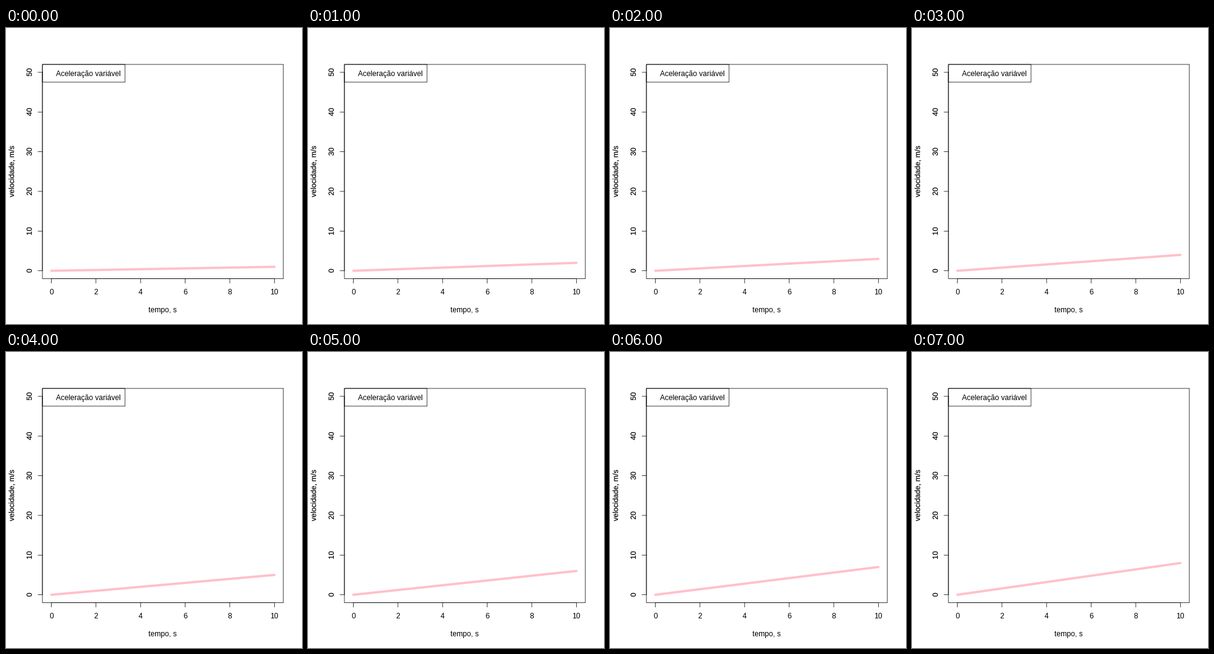
A matplotlib script that plays this animation: 480x480 px, repeating every 8000 ms.

```python
import matplotlib.pyplot as plt
from matplotlib.animation import FuncAnimation
from matplotlib.patches import PathPatch, Rectangle
from matplotlib.textpath import TextPath
from matplotlib.transforms import Affine2D

SIZE, DPI = 480, 72
LEFT, RIGHT, TOP, BOTTOM = 59.04, 449.76, 59.04, 406.56
TICK = 7.2
THIN = 0.75
FONT = "Liberation Sans"

plt.rcParams["font.family"] = FONT
plt.rcParams["font.size"] = 12
plt.rcParams["text.hinting"] = "force_autohint"

fig = plt.figure(figsize=(SIZE / DPI, SIZE / DPI), dpi=DPI, facecolor="white")
ax = fig.add_axes([0, 0, 1, 1])
ax.set_xlim(0, SIZE)
ax.set_ylim(SIZE, 0)
ax.axis("off")


def px(t):
    """Time in seconds to stage x."""
    return LEFT + (t + 0.4) / 10.8 * (RIGHT - LEFT)


def py(v):
    """Velocity in m/s to stage y."""
    return BOTTOM - (v + 2) / 54 * (BOTTOM - TOP)


def box(x0, y0, x1, y1):
    ax.add_patch(Rectangle((x0, y0), x1 - x0, y1 - y0, fill=False,
                           edgecolor="black", linewidth=THIN, snap=False))


def stroke(xs, ys):
    ax.plot(xs, ys, color="black", linewidth=THIN, snap=False,
            solid_capstyle="round")


def label(x, y, text, align="center"):
    ax.text(x, y, text, ha=align, va="baseline")


def upright(x, y, text):
    """Text reading upwards, centred on y with its baseline at x."""
    path = TextPath((0, 0), text, size=12, prop={"family": FONT})
    ends = path.get_extents()
    place = (Affine2D().translate(-(ends.x0 + ends.x1) / 2, 0)
             .scale(1, -1).rotate_deg(-90).translate(x, y))
    ax.add_patch(PathPatch(path.transformed(place), color="black",
                           linewidth=0.2, snap=False))


ramp, = ax.plot([], [], color="pink", linewidth=3.75, snap=False,
                solid_capstyle="round")

stroke([px(0), px(10)], [BOTTOM, BOTTOM])
for t in range(0, 11, 2):
    stroke([px(t), px(t)], [BOTTOM, BOTTOM + TICK])
    label(px(t), 432.5, str(t))

stroke([LEFT, LEFT], [py(0), py(50)])
for v in range(0, 51, 10):
    stroke([LEFT - TICK, LEFT], [py(v), py(v)])
    upright(41.76, py(v), str(v))

box(LEFT, TOP, RIGHT, BOTTOM)
box(LEFT, TOP, 193, 87.84)
label(80.64, 78, "Aceleração variável", "left")
label((LEFT + RIGHT) / 2, 461.3, "tempo, s")
upright(12.96, (TOP + BOTTOM) / 2, "velocidade, m/s")


def draw(step):
    ramp.set_data([px(0), px(10)], [py(0), py(step + 1)])
    return ramp,


anim = FuncAnimation(fig, draw, frames=8, interval=1000, repeat=True,
                     repeat_delay=0)
plt.show()
```
